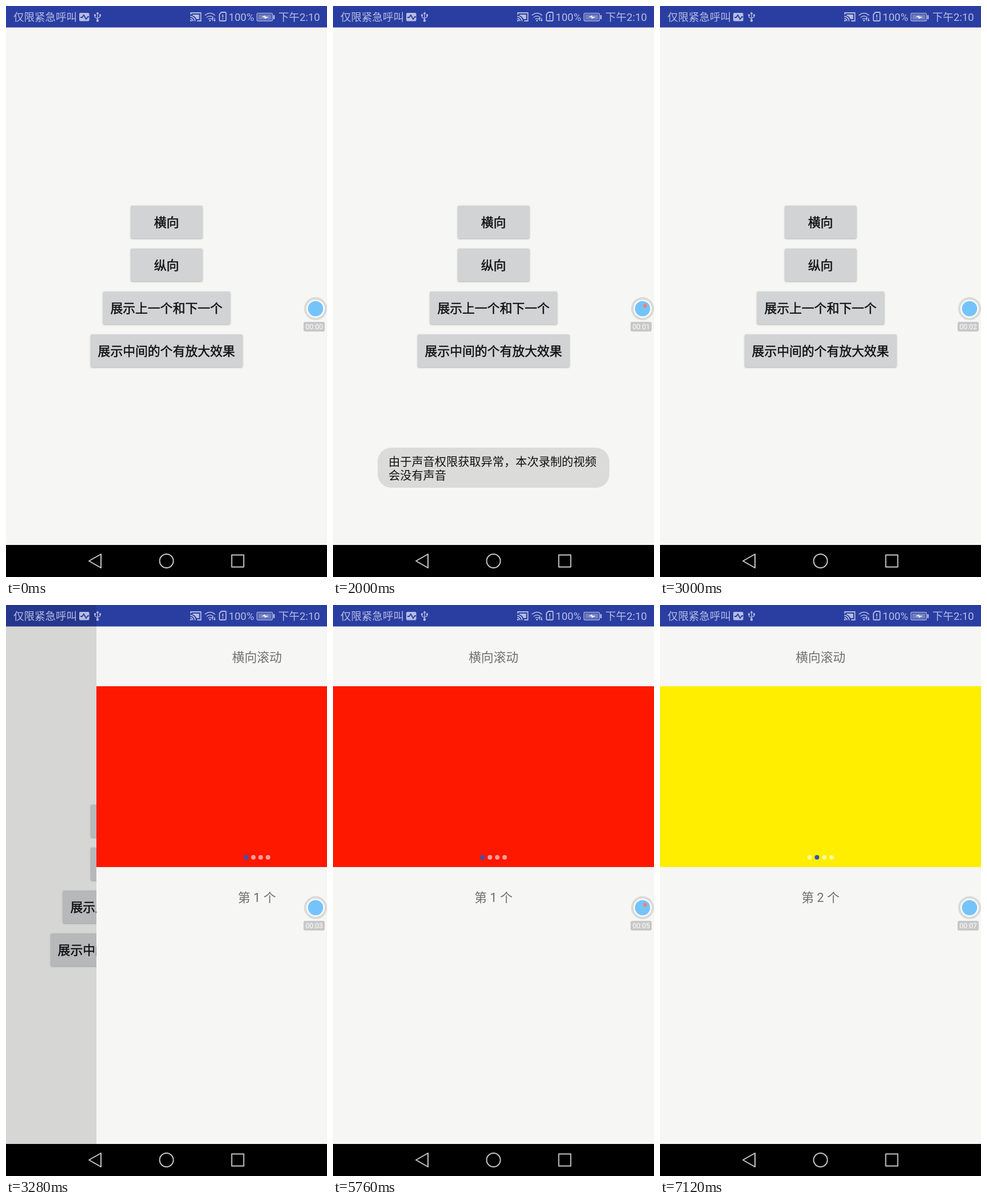
Recreate the animation shown at these times as an HTML page. Size 561 by 998 pixels, loop 8 s.

```html
<!DOCTYPE html>
<html lang="zh-CN">
<meta charset="utf-8">
<style>
  html, body { margin: 0; width: 100%; height: 100%; overflow: hidden; background: #f6f6f4; }
  svg { display: block; width: 561px; height: 998px; }
  text { font-family: Roboto, "Noto Sans CJK SC", "Noto Sans CJK", sans-serif; font-size: 21.8px; }
  .mid { text-anchor: middle; }
  .paper { fill: #f6f6f4; }
  .bar { fill: #2a3ea2; }
  .status { font-size: 18.5px; fill: #b6bde2; }
  .line { fill: none; stroke: #b6bde2; stroke-width: 1.8; }
  .thin { stroke-width: 1.3; }
  .solid { fill: #b6bde2; }
  #buttons rect { fill: #d1d3d4; filter: drop-shadow(0 1.5px 1.5px rgba(0, 0, 0, .3)); }
  #buttons text { fill: #111; font-weight: 500; stroke: #111; stroke-width: .5; }
  #page text { fill: #707070; }
  #toast text { font-size: 20.2px; fill: #111; }
  #nav { fill: none; stroke: #c6c6c6; stroke-width: 2; stroke-linejoin: round; }
</style>
<svg viewBox="0 0 561 998">
  <rect class="paper" width="561" height="998"/>
  <rect class="bar" width="561" height="37.5"/>
  <g id="buttons"></g>
  <rect id="dim" width="561" height="942" opacity="0"/>

  <g id="page">
    <rect class="paper" width="561" height="942"/>
    <rect class="bar" width="561" height="37.5"/>
    <text class="mid" x="280.5" y="99">横向滚动</text>
    <g id="slides">
      <rect y="142" width="561" height="316" fill="#ff1800"/>
      <rect x="561" y="142" width="561" height="316" fill="#ffee00"/>
    </g>
    <g id="dots"></g>
    <text class="mid" id="label" x="280.5" y="519">第 1 个</text>
  </g>

  <g id="toast">
    <rect x="78" y="772" width="405" height="70" rx="24" fill="#dbdbda"/>
    <text x="97" y="804">由于声音权限获取异常，本次录制的视频</text>
    <text x="97" y="828">会没有声音</text>
  </g>

  <!-- status bar -->
  <text class="status" x="13" y="26">仅限紧急呼叫</text>
  <rect class="solid" x="128" y="12" width="17.5" height="14.5" rx="2"/>
  <path d="M130 20h3l3-4 4 7 3-4h2" fill="none" stroke="#2a3ea2" stroke-width="1.8"/>
  <path class="line thin" d="M160 13v12M155.5 16v3.5l4.5 3M164.5 16v3l-4.5 2.5"/>
  <path class="solid" d="M157.5 14l2.5-4 2.5 4zM154 14.5h3v3h-3zM163 14.5h3v3h-3z"/>
  <circle class="solid" cx="160" cy="25.5" r="2.2"/>
  <path class="line" d="M323 15v-3h17.5v14H334M322 18a8.5 8.5 0 0 1 8.5 8.5M322 21.7a4.800 4.800 0 0 1 4.800 4.800"/>
  <path class="solid" d="M326 15h11.500v8H333q-2-5-7-6.500z"/>
  <circle class="solid" cx="323.200" cy="25.600" r="1.500"/>
  <path class="line thin" d="M347.500 16.500q9-8 18 0M350.500 20q6-5 12 0M353.500 23.200q3-2.500 6 0"/>
  <circle class="solid" cx="356.500" cy="25.500" r="1.500"/>
  <path class="line thin" d="M361 26v-5m-1.500 1.500 1.500-1.500 1.500 1.500M364.500 21v5m-1.500-1.500 1.500 1.500 1.500-1.500"/>
  <path class="line" d="M376.500 11h6.500q1.500 0 1.500 1.500v12q0 1.500-1.500 1.500h-8.500q-1.500 0-1.500-1.500V14.500zM378.800 15v5M378.800 21.500v2"/>
  <text class="status" x="389" y="26">100%</text>
  <rect class="line thin" x="438.600" y="12.600" width="27" height="13.400" rx="2"/>
  <rect class="solid" x="440.500" y="14.500" width="23.200" height="9.600" opacity=".5"/>
  <path class="solid" d="M467 16h2.500v7H467z"/>
  <path d="M446 19.500l7-3v2l6.500.5-7.500 3.500v-2.500z" fill="#eef0fa"/>
  <text class="status" x="476" y="26">下午2:10</text>

  <!-- navigation bar -->
  <rect y="942" width="561" height="56"/>
  <g id="nav">
    <path d="M145 970l21-12v24z"/>
    <circle cx="280.500" cy="970" r="12"/>
    <rect x="394.500" y="959.500" width="21" height="21"/>
  </g>

  <!-- recorder bubble -->
  <circle cx="541" cy="529" r="18" fill="#fafafa" stroke="#dadad9" stroke-width="4"/>
  <circle cx="541" cy="529" r="13.300" fill="#74c4fb"/>
  <circle id="blink" cx="545.500" cy="524" r="3.500" fill="#f2807c"/>
  <rect x="520" y="552" width="37" height="17" rx="3" fill="#c8c8c8"/>
  <text class="mid" id="clock" x="538.700" y="565.200" style="font-size:12.200px;fill:#fff">00:00</text>
</svg>
<script>
const $ = id => document.getElementById(id);
const clamp = v => Math.min(1, Math.max(0, v));
const span = (t, a, b) => clamp((t - a) / (b - a));
const easeOut = p => 1 - (1 - p) ** 2;
const shift = (id, x) => $(id).setAttribute('transform', `translate(${x} 0)`);

// cubic-bezier(.4, 0, .2, 1), solved by bisection
function standard(p) {
  let lo = 0, hi = 1, u = .5;
  for (let i = 0; i < 24; i++) {
    u = (lo + hi) / 2;
    const x = 1.2 * u * (1 - u) ** 2 + .6 * u * u * (1 - u) + u ** 3;
    if (x < p) lo = u; else hi = u;
  }
  return 3 * u * u * (1 - u) + u ** 3;
}

const choices = [['横向', 125], ['纵向', 125], ['展示上一个和下一个', 222], ['展示中间的个有放大效果', 265]];
$('buttons').innerHTML = choices.map(([name, w], i) => {
  const y = 349 + 75 * i;
  return `<rect x="${280.7 - w / 2}" y="${y}" width="${w}" height="57" rx="2"/>
    <text class="mid" x="280.5" y="${y + 37}">${name}</text>`;
}).join('');
$('dots').innerHTML = [0, 1, 2, 3].map(i =>
  `<circle cx="${261.5 + 12.8 * i}" cy="441" r="4"/>`).join('');

function draw(t) {
  const enter = t < 3078 ? 0 : standard(span(t, 3078, 3520));
  shift('buttons', Math.round(-97 * enter));
  $('dim').setAttribute('opacity', .18 * enter);
  shift('page', Math.round(561 * (1 - enter)));

  const fadeIn = easeOut(span(t, 40, 640)), fadeOut = span(t, 2000, 2540) ** 2;
  $('toast').setAttribute('opacity', fadeIn * (1 - fadeOut));

  shift('slides', Math.round(-561 * easeOut(span(t, 6220, 7050))));
  const current = t < 7080 ? 0 : 1;
  [...$('dots').children].forEach((dot, i) => {
    dot.setAttribute('fill', i === current ? '#3453b8' : '#fff');
    dot.setAttribute('opacity', i === current ? 1 : .58);
  });
  $('label').textContent = `第 ${current + 1} 个`;

  const lit = t >= 960 && (t - 960) % 2400 < 1200;
  $('blink').setAttribute('opacity', lit ? 1 : 0);
  $('clock').textContent = '00:0' + Math.max(0, Math.floor((t - 40) / 1000));
}

const start = performance.now();
function tick() {
  draw((performance.now() - start) % 8000);
  requestAnimationFrame(tick);
}
tick();
</script>
</html>
```
